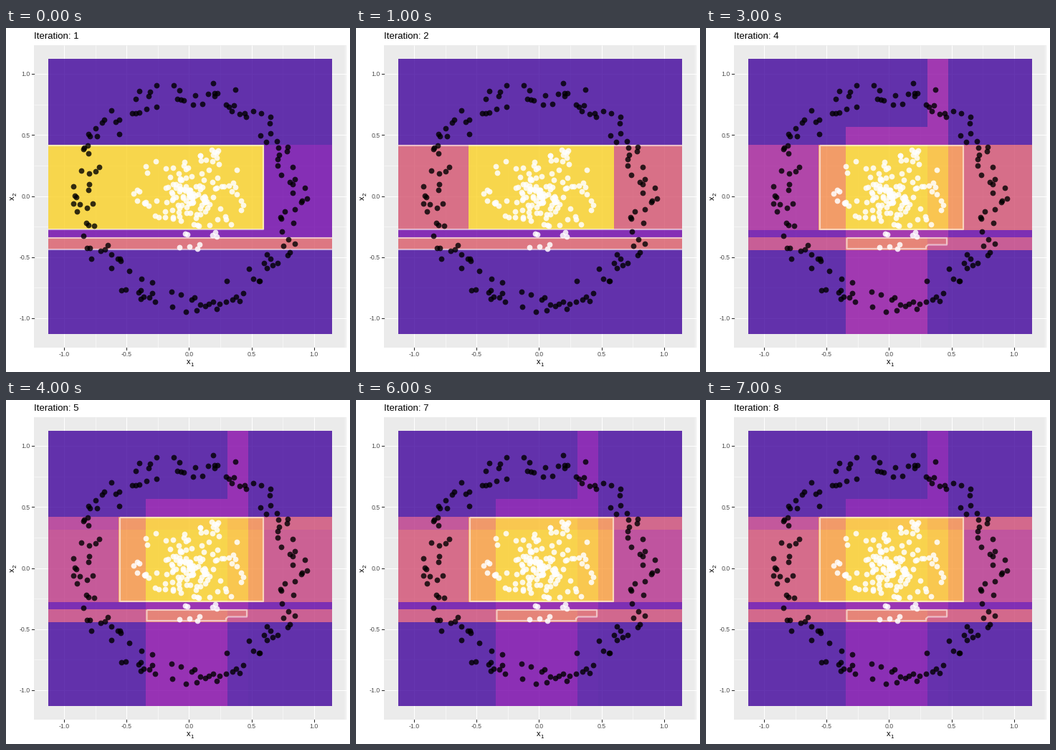
Recreate the animation shown at these times as a matplotlib script. Size 480x480 px, loop 8000 ms.

```python
import numpy as np
import matplotlib.pyplot as plt
from matplotlib.animation import FuncAnimation
from matplotlib.collections import LineCollection
from matplotlib.patches import Rectangle

SIZE, DPI = 480, 72
plt.rcParams["font.family"] = "Liberation Sans"
rng = np.random.default_rng(12)

fig = plt.figure(figsize=(SIZE / DPI, SIZE / DPI), dpi=DPI, facecolor="white")
ax = fig.add_axes([0, 0, 1, 1])
ax.axis("off")


def px(x):
    return 255.4 + 174.4 * x


def py(y):
    return 234.6 - 170.5 * y


# Panel, grid and axis labels
LEFT, RIGHT, TOP, BOTTOM = 39, 475, 24, 446
ax.add_patch(Rectangle((LEFT, TOP), RIGHT - LEFT, BOTTOM - TOP, fc="#EBEBEB", lw=0))


def grid_lines(ticks, width):
    style = dict(color="white", lw=width, zorder=1, solid_capstyle="butt")
    for t in ticks:
        ax.plot([px(t)] * 2, [TOP, BOTTOM], **style)
        if TOP < py(t) < BOTTOM:
            ax.plot([LEFT, RIGHT], [py(t)] * 2, **style)


ticks = np.arange(-1, 1.1, 0.5)
grid_lines(ticks + 0.25, 0.53)
grid_lines(ticks, 1.07)

for t in ticks:
    ax.plot([px(t)] * 2, [BOTTOM, BOTTOM + 2.75], color="#333333", lw=1.07)
    ax.plot([LEFT - 2.75, LEFT], [py(t)] * 2, color="#333333", lw=1.07)
    ax.text(px(t), 458, f"{t:.1f}", size=8.8, color="#4D4D4D", ha="center")
    ax.text(34, py(t) + 3.2, f"{t:.1f}", size=8.8, color="#4D4D4D", ha="right")

ax.text(252, 469, "x", size=11)
ax.text(257.6, 472, "1", size=7.7)
ax.text(14, 239.5, "x", size=11, rotation=90, ha="right", va="bottom")
ax.text(17, 234, "2", size=7.7, rotation=90, ha="right", va="bottom")
title = ax.text(39, 15, "", size=13.2)

# Prediction surface: boxes of log-odds, mapped to probability
X0, X1, Y0, Y1 = 59, 455, 43, 427
BASE = -2.2


class Surface:
    def __init__(self):
        self.odds = np.full((Y1 - Y0, X1 - X0), BASE)

    def box(self, x0, x1, y0, y1):
        return self.odds[y0 - Y0:y1 - Y0, x0 - X0:x1 - X0]

    def put(self, value, *box):
        self.box(*box)[:] = value

    def add(self, value, *box):
        self.box(*box)[:] += value

    def probability(self):
        return 1 / (1 + np.exp(-self.odds))


def early(left, right):
    s = Surface()
    s.put(-1.35, X0, X1, 163, 292)
    s.put(0.28, X0, X1, 292, 309)
    s.put(left, X0, 157, 163, 281)
    s.put(2.3, 157, 360, 163, 281)
    s.put(right, 360, X1, 163, 281)
    return s.probability()


def late(left, right, inner, column, upper, gap, strip):
    s = Surface()
    s.put(left, X0, 157, 163, 282)
    s.put(inner, 157, 360, 163, 282)
    s.put(right, 360, X1, 163, 282)
    s.add(-upper, X0, 360, 163, 181)
    s.add(upper, 360, X1, 163, 181)
    s.put(gap, X0, X1, 282, 292)
    s.put(strip, X0, X1, 292, 310)
    # central column, then the narrower one to its right
    s.add(column, 195, 309, 138, 282)
    s.add(column / 2, 195, 338, 282, 292)
    s.add(column / 2, 195, 309, 292, 310)
    s.add(column, 195, 309, 310, Y1)
    s.add(column, 309, 338, Y0, 163)
    s.add(column * 0.65, 309, 338, 163, 282)
    s.add(column * 0.3, 309, 338, 292, 302)
    s.add(0.12, 309, 338, 310, Y1)
    return s.probability()


round4 = np.array([-0.58, 0.12, 0.92, 1.35, 0, -1.5, -0.16])
round6 = np.array([0.12, -0.36, 1.2, 1.0, 0.36, -1.55, -0.04])
round8 = np.array([0.08, -0.32, 1.25, 0.95, 0.36, -1.45, 0.04])
rounds = [round4, (round4 + round6) / 2, round6, (round6 + round8) / 2, round8]
surfaces = [early(2.3, -1.35), early(0.16, 0.16), early(-0.32, 0.62)]
surfaces += [late(*r) for r in rounds]

tiles = ax.imshow(surfaces[0], cmap="plasma", vmin=0, vmax=1, alpha=0.8, zorder=2,
                  extent=(X0, X1, Y1, Y0), interpolation="nearest", aspect="auto")


# Decision boundaries
def across(y):
    return [(X0, y), (X1, y)]


BL, BR, BT, BB = 158.5, 358.5, 164, 281
stripe = [across(293), across(308.5)]
box = [(BL, BT), (BR, BT), (BR, BB), (BL, BB), (BL, BT)]
notch = [(196.5, 293), (336, 293), (336, 302.5), (310, 302.5), (307, 305),
         (307, 308), (196.5, 308), (196.5, 293)]
left_open = [(X0, 182.5), (156, 182.5), (BL, 180), (BL, BT), (BR, BT), (BR, BB), (X0, BB)]
closed = [box, notch]
bounds = [
    [[(X0, BT), (BR, BT), (BR, BB), (X0, BB)]] + stripe,
    [across(BT), across(BB)] + stripe,
    [[(X1, BT), (BL, BT), (BL, BB), (X1, BB)]] + stripe,
    closed, closed, [left_open, notch], closed, closed,
]
edges = LineCollection([], colors=[(1, 1, 1, 0.55)], linewidths=2.2, zorder=3,
                       capstyle="butt")
ax.add_collection(edges)


# Data: a noisy ring around a cluster that thins out from its centre
def dots(radius, angle, color, alpha):
    ax.scatter(px(radius * np.cos(angle)), py(radius * np.sin(angle)), s=60,
               color=color, alpha=alpha, lw=0, zorder=4)


N = 150
turn = 2 * np.pi * (np.arange(N) + rng.uniform(-2, 2, N)) / N
dots(rng.uniform(0.75, 0.95, N), turn, "black", 0.8)
dots(rng.uniform(0, 0.45, N), rng.uniform(0, 2 * np.pi, N), "white", 0.85)

ax.set_xlim(0, SIZE)
ax.set_ylim(SIZE, 0)


def draw(i):
    title.set_text(f"Iteration: {i + 1}")
    tiles.set_data(surfaces[i])
    edges.set_segments(bounds[i])
    return title, tiles, edges


anim = FuncAnimation(fig, draw, frames=8, interval=1000, repeat=True)
plt.show()
```
